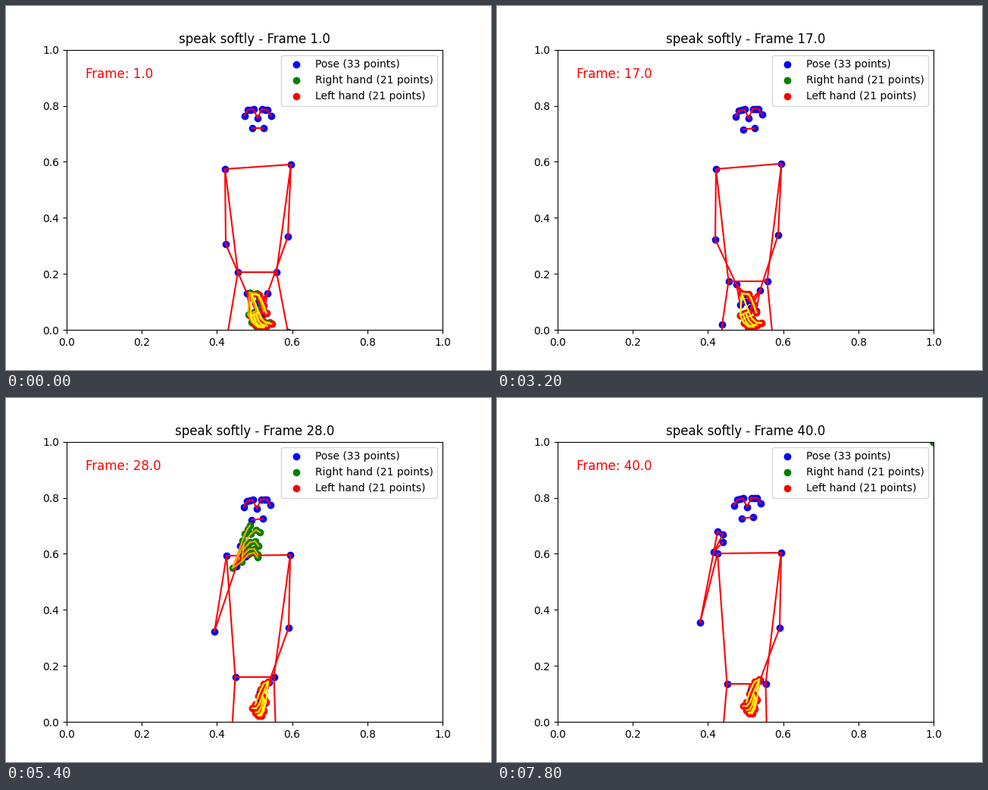
Animation, 640 px wide and 480 px high, one loop 8000 ms. Source, as a matplotlib script:

```python
import numpy as np
import matplotlib.pyplot as plt
from matplotlib.animation import FuncAnimation
from matplotlib.collections import LineCollection

W, H, DPI = 640, 480, 100
FRAMES, STEP = 40, 200

# Starting positions in stage pixels.
START = {
    "head": (332, 148),
    "l_shoulder": (376, 209), "r_shoulder": (289, 215),
    "l_elbow": (372, 304), "r_elbow": (290, 314),
    "l_wrist": (345, 379), "r_wrist": (318, 379),
    "l_hip": (357, 351), "r_hip": (306, 351),
    "l_knee": (372, 430), "r_knee": (291, 440),
}


def ramp(n, a, b):
    return min(max((n - a) / (b - a), 0), 1)


def smooth(u):
    return u * u * (3 - 2 * u)


def ease_out(u):
    return 1 - (1 - u) ** 3


# (first, last, easing, shifts); "hip" moves both hips.
MOVES = [
    (1, 12, ease_out, {
        "hip": (-.5, 12), "r_elbow": (-2, -6), "l_elbow": (-1, -2),
        "l_wrist": (2, -4), "r_wrist": (-2, -4),
        "l_knee": (-4, -1), "r_knee": (5, -18)}),
    (12, 21, smooth, {
        "r_wrist": (0, -13), "l_shoulder": (-1, -2),
        "l_knee": (-7, 16), "r_knee": (2, -4)}),
    (21, 28, smooth, {
        "head": (-1, -2), "r_shoulder": (2, -7), "l_elbow": (2, 1),
        "r_elbow": (-13, 0), "r_wrist": (-12, -140),
        "hip": (-3, 5), "l_knee": (-5, -5), "r_knee": (0, 22)}),
    (28, 33, smooth, {
        "head": (-2, 0), "shoulder": (0, -3), "r_elbow": (1, -12),
        "r_wrist": (-3, -9), "l_wrist": (1, -2), "hip": (-1, 5)}),
    (33, 40, smooth, {
        "head": (1, -2), "r_elbow": (-8, 0), "r_wrist": (-15, -10),
        "l_wrist": (-1, -1), "hip": (2, 4)}),
]

# Pinky, index and thumb of the body model, seen from the right wrist.
PALM = np.array([(5, 27), (12, 23), (12, 13)], float)


def joints(n):
    pos = {name: np.array(p, float) for name, p in START.items()}
    for a, b, ease, shifts in MOVES:
        u = ease(ramp(n, a, b))
        for key, shift in shifts.items():
            for name in pos:
                if key in name:
                    pos[name] += u * np.array(shift)
    return pos


def face(n):
    """Nose, eyes, ears and mouth around the nose, slightly rolled."""
    settled = ease_out(ramp(n, 1, 12))
    side = np.array([(5.5, -12), (9.5, -11.5), (13, -11), (17.5, -3.5)])
    left, right = side, side * (-1, 1)
    mouth = [(8, 13 + settled), (-7, 13 + settled)]
    p = np.vstack([[(0, 0)], left[:3], right[:3], left[3:], right[3:], mouth])
    p[:, 1] -= .09 * settled * p[:, 0]
    return p


def pose(n, j):
    flip = 1 - 2 * smooth(ramp(n, 21, 28))
    p = np.zeros((29, 2))
    p[:11] = face(n) + j["head"]
    parts = {11: "shoulder", 13: "elbow", 15: "wrist", 23: "hip", 25: "knee"}
    for s, side in enumerate("lr"):
        for k, part in parts.items():
            p[k + s] = j[f"{side}_{part}"]
        p[27 + s] = p[25 + s] + (0, 60)
        p[17 + s:23 + s:2] = p[15 + s] + PALM * ((1, flip) if s else (-1, 1))
    return p


# Wrist, thumb base and tip, index base and tip, pinky base and tip, bend.
def shape(*points):
    return np.array(points, float)


FOLDED = shape((-13, -21), (-4, -20), (6, 4), (-4, 3), (13, 18),
               (-15, 8), (2, 23), (-1, 4.5))
HANGING = shape((-1, -1), (-7, 2), (-18, 29), (-9, 18), (-22, 34),
                (-4, 26), (-14, 44), (.5, 5.5))
CURLED = shape((-5, 2), (8, -34), (18, -54), (10, -30), (31, -45),
               (7, -6), (28, -12), (2, -8))
SPREAD = shape((-3, 0), (1, -14), (23, -52), (12, -32), (36, -45),
               (13, -13), (37, -24), (2, -3))


def hand(form, origin):
    """Expand a shape to 21 joints, four along each digit."""
    wrist, t0, t1, i0, i1, p0, p1, bend = form
    digits = [(t0, t1, np.array([0, -2]))]
    for u in np.linspace(0, 1, 4):
        fan = 1 - (1 - u) ** 2
        digits.append((i0 + (p0 - i0) * u, i1 + (p1 - i1) * fan, bend))
    pts = [wrist]
    for base, tip, arc in digits:
        for u in np.linspace(0, 1, 4):
            pts.append(base + (tip - base) * u + arc * (0 < u < 1))
    return np.array(pts) + origin


def folded(n, side):
    loose = 1 - ramp(n, 1, 5)
    return hand(FOLDED, np.array([336, 400]) + side * loose * np.array([1.5, 1]))


def left_hand(n, j):
    if 20 <= n < 25:
        return None
    return folded(n, 1) if n < 20 else hand(HANGING, j["l_wrist"])


def right_hand(n, j):
    if 20 <= n < 27 or n in (37, 39, 40):
        return None
    if n < 20:
        return folded(n, -1)
    return hand(CURLED + (SPREAD - CURLED) * ramp(n, 28, 33), j["r_wrist"])


POSE_LINKS = [(0, 1), (1, 2), (2, 3), (3, 7), (0, 4), (4, 5), (5, 6), (6, 8),
              (9, 10), (11, 12), (11, 23), (12, 24), (23, 24)]
for s in (0, 1):
    POSE_LINKS += [(a + s, b + s) for a, b in [
        (11, 13), (13, 15), (15, 17), (15, 19), (15, 21), (17, 19),
        (23, 25), (25, 27)]]
HAND_LINKS = [(0, 1), (0, 5), (0, 17), (5, 9), (9, 13), (13, 17)]
HAND_LINKS += [(i, i + 1) for k in range(1, 21, 4) for i in range(k, k + 3)]

fig, ax = plt.subplots(figsize=(W / DPI, H / DPI), dpi=DPI)
ax.set(xlim=(0, 1), ylim=(0, 1))
title = ax.set_title("")
label = ax.text(.05, .9, "", color="red", fontsize=12)


def layer(name, dot, line, links):
    dots = ax.scatter([], [], color=dot, label=name)
    lines = LineCollection([], colors=line, linewidths=1.5, zorder=2,
                           capstyle="projecting")
    ax.add_collection(lines, autolim=False)
    return dots, lines, np.array(links)


body = layer("Pose (33 points)", "blue", "red", POSE_LINKS)
right = layer("Right hand (21 points)", "green", "orange", HAND_LINKS)
left = layer("Left hand (21 points)", "red", "yellow", HAND_LINKS)
ax.legend(loc="upper right")


def place(group, pixels):
    """Show the points; an undetected hand collapses into the corner."""
    dots, lines, links = group
    if pixels is None:
        pts = np.ones((21, 2))
    else:
        pts = (pixels - (80, 427.2)) / (496, -369.6)
    dots.set_offsets(pts)
    lines.set_segments(pts[links])


def draw(i):
    n = i + 1
    j = joints(n)
    title.set_text(f"speak softly - Frame {n:.1f}")
    label.set_text(f"Frame: {n:.1f}")
    place(body, pose(n, j))
    place(right, right_hand(n, j))
    place(left, left_hand(n, j))
    return []


anim = FuncAnimation(fig, draw, frames=FRAMES, interval=STEP,
                     repeat=True, repeat_delay=0)
plt.show()
```
